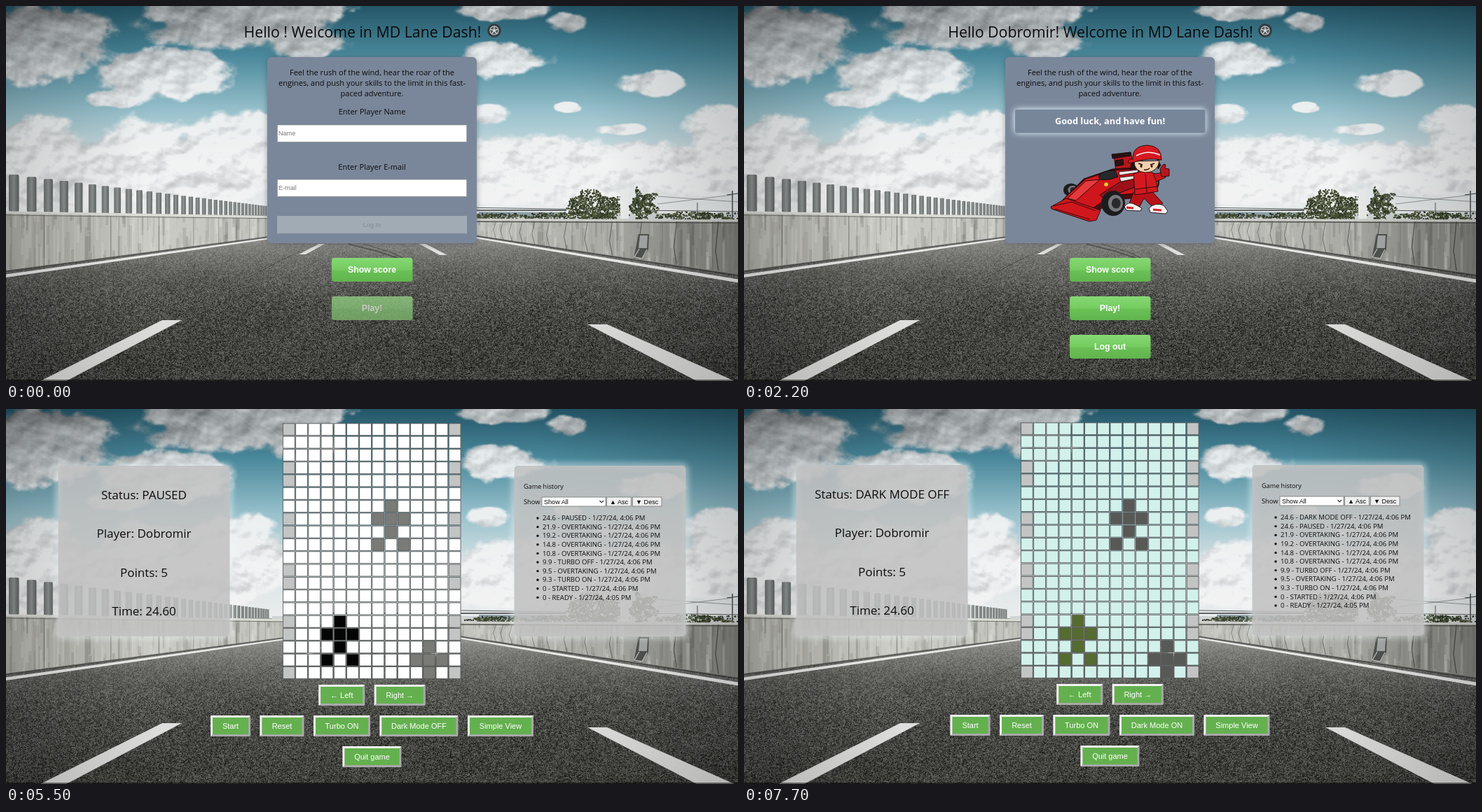
These frames come from a looping animation (1045x536 px, 8 s). An HTML page with a canvas:

```html
<!DOCTYPE html>
<html lang="en">
<head>
<meta charset="utf-8">
<title>Race game</title>
<style>
  html, body { margin: 0; width: 100%; height: 100%; overflow: hidden; background: #444; }
  canvas, svg { position: absolute; left: 0; top: 0; width: 100%; height: 100%; display: block; }
  text { white-space: pre; }
  .hand { font-family: "Comic Sans MS", "Open Sans", sans-serif; }
  .ui { font-family: "Liberation Sans", Arial, sans-serif; }
  .mid { text-anchor: middle; }
  .bold { font-weight: 700; }
</style>
</head>
<body>
<canvas id="road" width="1045" height="536"></canvas>
<svg id="stage" viewBox="0 0 1045 536" preserveAspectRatio="none" xmlns="http://www.w3.org/2000/svg">
  <defs>
    <linearGradient id="green" x2="0" y2="1">
      <stop offset="0" stop-color="#86d873"/><stop offset=".5" stop-color="#74cb60"/>
      <stop offset=".55" stop-color="#69c055"/><stop offset="1" stop-color="#61b44e"/>
    </linearGradient>
    <filter id="blur" x="-30%" y="-60%" width="160%" height="220%"><feGaussianBlur stdDeviation="4"/></filter>
  </defs>
  <g id="view"></g>
</svg>
<script>
const W = 1045, H = 536;
const PLAYER = 'Dobromir', GAME = 'MD Lane Dash', MAIL = 'dobrowik.d@example.com';

// ---------- scenery ----------
const hash = (x, y) => {
  let h = Math.imul(x, 374761393) + Math.imul(y, 668265263) | 0;
  h = Math.imul(h ^ (h >>> 13), 1274126177);
  return ((h ^ (h >>> 16)) >>> 0) / 4294967296;
};
const lerp = (a, b, t) => a + (b - a) * t;
const smooth = (a, b, v) => {
  const t = Math.min(1, Math.max(0, (v - a) / (b - a)));
  return t * t * (3 - 2 * t);
};
const noise = (x, y) => {
  const i = Math.floor(x), j = Math.floor(y), u = smooth(0, 1, x - i), v = smooth(0, 1, y - j);
  return lerp(lerp(hash(i, j), hash(i + 1, j), u), lerp(hash(i, j + 1), hash(i + 1, j + 1), u), v);
};
const fbm = (x, y) => {
  let sum = 0, amp = .5;
  for (let o = 0; o < 5; o++, amp /= 2, x = x * 2 + 17, y = y * 2 + 31) sum += amp * noise(x, y);
  return sum;
};

// centre x, centre y, radius x, radius y
const clouds = [
  [45, 55, 120, 68], [225, 98, 122, 40], [330, 20, 160, 44], [425, 50, 68, 26], [145, 132, 42, 15],
  [50, 228, 130, 76], [210, 226, 130, 66], [335, 215, 95, 68],
  [708, 76, 74, 26], [800, 24, 32, 16], [705, 6, 70, 18], [918, 110, 54, 20], [688, 155, 36, 17],
  [803, 145, 22, 9], [875, 176, 38, 9], [760, 236, 145, 56], [960, 230, 150, 46], [1020, 175, 66, 36]
];
const skyStops = [[0, 36, 86, 104], [70, 74, 136, 155], [150, 152, 193, 204], [220, 214, 225, 228], [300, 236, 237, 237]];

function skyColor(x, y) {
  const i = Math.max(1, skyStops.findIndex(s => s[0] > y)), a = skyStops[i - 1], b = skyStops[i];
  const t = (y - a[0]) / (b[0] - a[0]);
  let depth = -1;
  for (const [cx, cy, rx, ry] of clouds) {
    const dx = (x - cx) / rx, dy = (y - cy) / ry;
    depth = Math.max(depth, 1 - dx * dx - dy * dy);
  }
  const u = x / 36, v = y / 27, n = fbm(u, v);
  const cover = smooth(0, .42, depth + (n - .47) * 1.5) * .92;
  const relief = (n - fbm(u + .1, v + .22)) * 150 + (n - .48) * 50;
  const light = Math.min(238, lerp(146, 226, smooth(0, 135, y)) + x / 22) + relief;
  return [0, 1, 2].map(k => lerp(lerp(a[k + 1], b[k + 1], t), Math.min(243, light + k), cover));
}

function roadColor(x, y) {
  const d = Math.max(0, y - 326);
  const grain = hash(x, y) * .5 + noise(x / 1.7, y / 1.5) * .5 - .5;
  const v = 60 + 92 * Math.exp(-d / 62) + grain * (30 + Math.min(75, d * .8)) + (noise(x / 90, y / 30) - .5) * 10;
  return [v, v, v - 3];
}

function paintScenery() {
  const g = document.getElementById('road').getContext('2d');
  const img = g.createImageData(W, H);
  for (let y = 0, p = 0; y < H; y++) for (let x = 0; x < W; x++, p += 4) {
    img.data.set(y < 299 ? skyColor(x, y) : roadColor(x, y), p);
    img.data[p + 3] = 255;
  }
  g.putImageData(img, 0, 0);

  const poly = (fill, ...p) => {
    g.fillStyle = fill;
    g.beginPath();
    for (let i = 0; i < p.length; i += 2) g.lineTo(p[i], p[i + 1]);
    g.closePath();
    g.fill();
  };
  const line = (color, width, ...p) => {
    g.strokeStyle = color;
    g.lineWidth = width;
    g.beginPath();
    for (let i = 0; i < p.length; i += 2) g.lineTo(p[i], p[i + 1]);
    g.stroke();
  };
  const fade = (x0, x1, ...colors) => {
    const f = g.createLinearGradient(x0, 0, x1, 0);
    colors.forEach((c, i) => f.addColorStop(i / (colors.length - 1), c));
    return f;
  };
  const leaves = (cx, cy, rx, ry, count) => {
    for (let i = 0; i < count; i++) {
      const a = hash(i, cx) * 6.283, v = hash(i, 5);
      const r = Math.sqrt(hash(i, cy + 7)) * (.55 + .7 * noise(a * 3, cx));
      g.fillStyle = `rgb(${32 + v * 66},${40 + v * 66},${26 + v * 46})`;
      g.fillRect(cx + Math.cos(a) * r * rx, cy + Math.sin(a) * r * ry, 2, 2);
    }
  };

  // far skyline
  poly('#cfd3d3', 380, 296, 1045, 296, 1045, 308, 380, 308);
  line('#33393a', 1.5, 440, 292, 800, 292);
  line('#44494a', 1.2, 580, 296, 580, 313, 650, 313);
  line('#59605f', 1, 650, 288, 1045, 294);
  poly('#8e9fa6', 675, 294, 800, 295, 800, 302, 675, 302);
  leaves(700, 300, 50, 5, 220);
  leaves(820, 299, 75, 5, 340);
  leaves(985, 299, 62, 6, 340);
  leaves(842, 286, 42, 21, 900);
  leaves(908, 284, 21, 24, 520);
  poly('#e9eaea', 877, 262, 889, 262, 889, 304, 877, 304);
  line('#3b4040', 1.4, 1037, 264, 1037, 303);
  line('#3b4040', 1.2, 1029, 270, 1045, 268);
  line('#777', .7, 930, 283, 1037, 270);
  line('#777', .7, 930, 272, 1045, 280);
  line('#555', 1, 987, 281, 987, 300);

  // posts and left wall
  for (let k = 0; k < 35; k++) {
    const r = .938 ** k, x = 420 - 416 * r, w = 13.5 * r + 1, top = 292 - 51 * r;
    g.fillStyle = fade(x, x + w, '#6a706e', '#8f9492', '#5c6261');
    g.beginPath();
    g.roundRect(x, top, w, 302 - 8 * r - top, 2 * r);
    g.fill();
  }
  const wall = (corners, fill, x0, x1, topAt, footAt) => {
    poly(fill, ...corners);
    for (let i = 0; i < 260; i++) {
      const t = hash(i, 77), x = lerp(x0, x1, t), top = topAt(t), foot = footAt(t);
      const len = hash(i, 78) ** 2 * (foot - top);
      g.fillStyle = i % 3 ? `rgba(55,55,50,${.03 + hash(i, 79) * .13})` : 'rgba(235,235,228,.2)';
      g.fillRect(x, i % 2 ? top : foot - len, 1 + hash(i, 80) * 4, len);
    }
  };
  wall([0, 295, 398, 302, 398, 327, 0, 379], fade(0, 398, '#aeaea7', '#cbcbc5', '#c2c2bd'), 0, 395,
    t => 297 + 5 * t, t => 378 - 51 * t);
  line('#dcdcd7', 3.5, 0, 295, 398, 302);
  line('#73746f', 1.1, 0, 299, 398, 304);
  for (let k = 0; k < 9; k++) {
    const t = 1 - .72 ** (k + .45);
    line('rgba(60,60,57,.5)', 1.4 - t, 395 * t, 298 + 5 * t, 395 * t, 378 - 51 * t);
  }
  line('rgba(35,35,35,.5)', 2, 0, 379, 398, 327);

  // right wall
  wall([640, 304, 1045, 307, 1045, 385, 640, 324], fade(640, 1045, '#c6c6c1', '#adada8', '#82837e'), 645, 1045,
    t => 305 + 2 * t, t => 325 + 58 * t);
  line('#cdcec9', 3, 640, 305, 1045, 307);
  line('#54554f', 1.3, 640, 308, 1045, 310);
  for (let k = 0; k < 12; k++) {
    const t = .84 ** k * .93;
    line('rgba(45,45,42,.6)', .5 + t, 645 + 400 * t, 308, 641 + 400 * t, 315 + 38 * t, 645 + 400 * t, 325 + 57 * t);
  }
  line('rgba(30,30,30,.55)', 2, 640, 324, 1045, 385);
  poly('#50524f', 903, 326, 918, 326, 917, 348, 908, 361, 896, 361);
  poly('#a5a8a6', 905, 328, 916, 328, 915, 346, 903, 346);
  line('#c2c4c2', 1.3, 904, 347, 897, 359, 908, 361, 915, 348);

  // paint on the asphalt
  const white = '#dededc';
  poly('#e8e8e6', 0, 383.5, 398, 328, 398, 330, 0, 388);
  poly('#e8e8e6', 640, 325, 1045, 390.5, 1045, 395.5, 640, 327);
  poly(white, 49, 536, 86, 536, 251, 449, 223, 449);
  poly(white, 830, 455, 858, 455, 1040, 536, 986, 536);
  poly(white, 418, 355, 428, 355, 455, 340, 447, 340);
  poly(white, 590, 340, 599, 340, 630, 356, 619, 356);
  line('rgba(25,25,25,.45)', 1.5, 488, 340, 528, 350, 565, 362);
  line('rgba(25,25,25,.4)', 1.3, 510, 340, 550, 352, 590, 372);
  line('rgba(25,25,25,.3)', 1, 420, 350, 345, 388);

  const dim = g.createRadialGradient(522, 290, 340, 522, 290, 680);
  dim.addColorStop(0, 'rgba(0,0,0,0)');
  dim.addColorStop(1, 'rgba(0,0,0,.28)');
  g.fillStyle = dim;
  g.fillRect(0, 0, W, H);
  g.fillStyle = 'rgba(0,0,0,.5)';
  g.fillRect(0, 534, W, 2);
}

// ---------- interface ----------
const text = (x, y, s, size, cls = 'hand', fill = '#0b0b0b') =>
  `<text x="${x}" y="${y}" font-size="${size}" class="${cls}" fill="${fill}">${s}</text>`;
const rect = (x, y, w, h, fill, more = '') =>
  `<rect x="${x}" y="${y}" width="${w}" height="${h}" fill="${fill}" ${more}/>`;
const path = (d, fill, more = 'stroke="#1b0a0a" stroke-width=".9" stroke-linejoin="round"') =>
  `<path d="${d}" fill="${fill}" ${more}/>`;
const oval = (x, y, rx, ry, fill, more = '') =>
  `<ellipse cx="${x}" cy="${y}" rx="${rx}" ry="${ry}" fill="${fill}" ${more}/>`;

const wheelIcon = x => {
  let s = oval(x, 35, 9.8, 9.8, '#343a3d') + oval(x, 35, 6.8, 6.8, '#b7bdc0') + oval(x, 35, 5.6, 5.6, '#545b5e');
  for (let k = 0; k < 5; k++) s += `<path d="M${x} 35v-6" stroke="#c6cbcd" stroke-width="1.5" transform="rotate(${k * 72} ${x} 35)"/>`;
  return s + oval(x, 35, 1.8, 1.8, '#d5d9da');
};
const tick = y => rect(517, y - 5.5, 11, 11, '#55d35c', 'rx="1.5"') +
  path(`M519.3 ${y}l2.4 2.5 4.4-5`, 'none', 'stroke="#fff" stroke-width="1.6"');

const glossy = (y, label, disabled) => (disabled ? rect(465, y, 115.5, 34, '#aaa8a4', 'rx="4" opacity=".6"') : '') +
  `<g opacity="${disabled ? .55 : 1}">` + rect(465, y, 115.5, 34, 'url(#green)', 'rx="4"') +
  text(522.5, y + 21.3, label, 12.3, 'ui mid bold', '#fff') + '</g>';

const field = (y, value, fill) => rect(387.3, y, 270.5, 24.3, '#fff', 'stroke="#8b8b8b" stroke-width=".7"') +
  text(389, y + 15.2, value, 9.1, 'ui', fill);

function racer() {
  const tyre = (x, y, rx, ry) => oval(x, y, rx, ry, '#1c1c1e') +
    oval(x + rx * .2, y, rx * .62, ry * .66, '#77797c') + oval(x + rx * .25, y, rx * .38, ry * .42, '#2a2a2c');
  return tyre(581, 252, 12, 14) + tyre(467, 263, 11, 9.5) +
    path('M528 213l24-4 5 24-26 4z', '#b5161c') + path('M525 212l27-3v5l-26 4z', '#241316') +
    path('M530 221l11-2 1 8-11 2z', '#2b1214') +
    path('M455 277l30-30 41-14 34-2 26 18-16 24-46 5-24 20-47-10z', '#4a0d12') +
    path('M458 274l30-27 38-12 34-2 24 16-16 18-44 4-26 18-44-10z', '#cf161d') +
    path('M508 270l34-22 26-4 10 8-34 12-30 12z', '#9c1017') +
    path('M506 243q8-9 24-8l4 9q-14 6-26 4z', '#26282b') +
    path('M535 237l28-3-1 4-26 4zM536 245l26-3v4l-24 5z', '#f1e9e6') +
    path('M488 250l20-2-34 30-12-3z', '#e43a3d') +
    path('M438 287l22-12 49 17-6 14-10 2-54-18z', '#d1171e') + path('M441 286l26-6 36 13M444 290l50 15', 'none') +
    tyre(527, 282, 17, 18) + oval(517, 255, 2.8, 2.8, '#f2cf28') +
    path('M556 266l24-4 18 20-13 7-14-14-8 15-14-5z', '#b81219') +
    path('M543 287q5-9 16-3l9 5-2 4-20-1zM578 289q9-9 21-4l6 8-3 4-22-2z', '#f3f1ef') +
    path('M546 288l10 1M584 291l12 1', 'none', 'stroke="#d5232a" stroke-width="3"') +
    path('M556 240q17-8 31 0l4 25-33 5z', '#d31920') + path('M558 262l32-4M573 240l2 26', 'none') +
    path('M584 240l16-2 2 7-13 6z', '#c9141b') +
    path('M594 233l5-7 3 1-1 5 6 1v10l-11 1z', '#b7161c') +
    path('M554 221l-3 13 8-2 2-10zM590 218l5 10-4 5z', '#221512') +
    path('M557 222q0 15 16 16 18 0 20-17z', '#f3cfae') +
    path('M555 219q-1-19 21-20 20 1 20 21-18-4-42 4-10 2-3-5z', '#d8181f') +
    path('M560 214q17-9 34-1', 'none', 'stroke="#f4eeee" stroke-width="1.5"') +
    path('M563 225l6 2M580 227l6-2M571 234q5 1 8-2', 'none', 'stroke="#241310" stroke-width="1.4"') +
    oval(567, 229, 1.5, 2, '#241310') + oval(582, 229, 1.5, 2, '#241310');
}

function lobby({ who = '', filled, entered, hover }) {
  let s = text(509, 45, `Hello ${who}! Welcome in ${GAME}!`, 21.3, 'hand mid') + wheelIcon(entered ? 744 : 697);
  s += rect(373, 74, 299, 266, '#39424c', 'rx="7" opacity=".5" filter="url(#blur)"') + rect(373, 73, 299, 266, '#7a879a', 'rx="6"');
  ['Feel the rush of the wind, hear the roar of the', 'engines, and push your skills to the limit in this fast-',
    'paced adventure.'].forEach((l, i) => s += text(522.5, 98.7 + i * 15, l, 11.1, 'hand mid'));
  if (entered) {
    s += rect(386, 147, 273, 35, '#e3f4fb', 'rx="5" filter="url(#blur)"') + rect(387, 148, 271.5, 33.5, '#78869a', 'rx="3"') +
      text(522.5, 168.5, 'Good luck, and have fun!', 12.75, 'hand mid bold', '#fff') + racer();
  } else {
    s += filled ? tick(151.5) + tick(230) :
      text(522.5, 155, 'Enter Player Name', 11, 'hand mid') + text(522.5, 233.5, 'Enter Player E-mail', 11, 'hand mid');
    s += filled ? field(170, PLAYER, '#222') + field(248, MAIL, '#222') +
      rect(386, 247, 273, 26.5, 'none', 'rx="2" stroke="#fff" stroke-width="1.6"') +
      rect(387.3, 248.2, 270.5, 24, 'none', 'rx="1.5" stroke="#101010" stroke-width="1.5"')
      : field(170, 'Name', '#777') + field(248, 'E-mail', '#777');
    s += rect(387.3, 300.3, 270.5, 24.5, filled ? '#efefef' : '#a0abb3', `stroke="${filled ? '#999' : '#a9b2b9'}" stroke-width=".6"`) +
      text(522.5, 315.7, 'Log In', 9.1, 'ui mid', filled ? '#111' : '#7d8b96');
  }
  s += glossy(360, 'Show score');
  if (hover) s += rect(457, 409, 131, 45, '#8dff00', 'rx="8" filter="url(#blur)"') + rect(461.5, 413.5, 122, 36, '#5fa84b', 'rx="4"') +
    text(522.5, 436.2, 'Play!', 12.8, 'ui mid bold', '#fff');
  else s += glossy(415, 'Play!', !entered);
  return entered ? s + glossy(470, 'Log out') : s;
}

const buttonWidth = {
  '← Left': 66, 'Right →': 73, 'Start': 57, 'Reset': 63, 'Turbo ON': 81, 'Dark Mode OFF': 112, 'Dark Mode ON': 107,
  'Simple View': 94, 'Extended View': 106, 'Quit game': 84
};
function buttonRow(y, labels, hot) {
  const gap = 13.5, total = labels.reduce((n, l) => n + buttonWidth[l] + gap, -gap);
  let x = 522.5 - total / 2, s = '';
  for (const l of labels) {
    const w = buttonWidth[l];
    s += rect(x, y, w, 30, '#a9a9a9', 'rx="1.5"') + path(`M${x} ${y}h${w}l-3 3H${x + 3}V${y + 27}l-3 3z`, '#f1f1f1', '') +
      rect(x + 3, y + 3, w - 6, 24, l === hot ? '#559b47' : '#64b04f') +
      text(x + w / 2, y + 18.8, l, 11, 'ui mid', '#fff');
    x += w + gap;
  }
  return s;
}

const carShape = [[0, 0], [-1, 1], [0, 1], [1, 1], [0, 2], [-1, 3], [1, 3]];
function board(top, { lane, roll, cars, fill = '#fff', me = '#050505', other = '#7a7a76' }) {
  const paint = {};
  const put = (c, r, color) => carShape.forEach(([dx, dy]) => paint[[c + dx, r + dy]] = color);
  cars.forEach(([c, r]) => put(c, r, other));
  put(lane, 15, me);
  let s = '';
  for (let r = 0; r < 20; r++) for (let c = 0; c < 14; c++) {
    const edge = (c === 0 || c === 13) && (r + roll) % 4 < 2;
    s += rect((395.4 + c * 18.22).toFixed(2), (top + r * 18.3).toFixed(2), 16.8, 16.9, paint[[c, r]] || (edge ? '#c3c4c4' : fill));
  }
  return `<g stroke="#585c5c" stroke-width=".9">${s}</g>`;
}

const panel = x => rect(x, 81, 245, 244, 'none', 'rx="6" stroke="#eef6f8" stroke-width="5" opacity=".75" filter="url(#blur)"') +
  rect(x, 81, 245, 244, '#c2c2c2', 'rx="5" opacity=".87"');

function sidePanels(status, points, time, log) {
  let s = panel(74.5) + panel(725.5);
  [`Status: ${status}`, `Player: ${PLAYER}`, `Points: ${points}`, `Time: ${time}`]
    .forEach((l, i) => s += text(197, 129 + i * 55.3, l, 17, 'hand mid'));
  s += text(739, 113.7, 'Game history', 9.1) + text(739, 135.8, 'Show', 9.3);
  const box = 'stroke="#757575" stroke-width=".8"';
  s += rect(765, 126, 91, 13, '#fff', box) + text(768, 135.6, 'Show All', 9.1, 'ui') +
    path('M847.5 131l2.8 2.8 2.8-2.8', 'none', 'stroke="#222" stroke-width="1.1"');
  s += rect(857.5, 126, 35, 13, '#efefef', box) + text(875, 135.6, '▲ Asc', 9.1, 'ui mid');
  s += rect(894.5, 126, 41.5, 13, '#efefef', box) + text(915.2, 135.6, '▼ Desc', 9.1, 'ui mid');
  log.forEach((l, i) => {
    const y = 156 + i * 12.6;
    s += oval(759, y, 1.7, 1.7, '#111') + text(766, y + 3.2, `${l} - 1/27/24, 4:0${l === '0 - READY' ? 5 : 6} PM`, 9.6);
  });
  return s;
}

function game(grid, { simple, dark = 'Dark Mode OFF', status, points = 5, time = '24.60', log }) {
  const dy = simple ? 15.3 : 0, mode = simple ? 'Extended View' : 'Simple View';
  return (simple ? text(522.5, 10.7, `Points: ${points} --- Time: ${time}`, 11.5, 'hand mid', '#67a650')
    : sidePanels(status, points, time, log)) +
    board(20.8 + dy, grid) + buttonRow(394 + dy, ['← Left', 'Right →']) +
    buttonRow(438 + dy, ['Start', 'Reset', 'Turbo ON', dark, mode], simple && mode) + buttonRow(482 + dy, ['Quit game']);
}

// ---------- timeline ----------
const history = ['24.6 - DARK MODE OFF', '24.6 - PAUSED', '21.9 - OVERTAKING', '19.2 - OVERTAKING', '14.8 - OVERTAKING',
  '10.8 - OVERTAKING', '9.9 - TURBO OFF', '9.5 - OVERTAKING', '9.3 - TURBO ON', '0 - STARTED', '0 - READY'];
const ready = { lane: 7, roll: 0, cars: [] };
const paused = { lane: 4, roll: 1, cars: [[8, 6], [11, 17]] };
const tinted = { ...paused, fill: '#d2f1eb', me: '#556b2f', other: '#585956' };
const lift = s => `<g transform="translate(0 -1)">${s}</g>`;
const scenes = [
  () => lobby({}),
  () => lift(lobby({ filled: true })),
  () => lobby({ who: PLAYER, entered: true }),
  () => lobby({ who: PLAYER, entered: true, hover: true }),
  () => game(ready, { status: 'READY', points: 0, time: '0.00', log: history.slice(-1) }),
  () => game(paused, { status: 'PAUSED', log: history.slice(1) }),
  () => game(paused, { simple: true }),
  () => lift(game(tinted, { status: 'DARK MODE OFF', dark: 'Dark Mode ON', log: history }))
];

const view = document.getElementById('view');
let shown = -1;
function update(ms) {
  const step = Math.floor(ms % 8000 / 1100);
  if (step !== shown) view.innerHTML = scenes[shown = step]();
}
function tickFrame() {
  update(performance.now());
  requestAnimationFrame(tickFrame);
}
paintScenery();
tickFrame();
</script>
</body>
</html>
```
